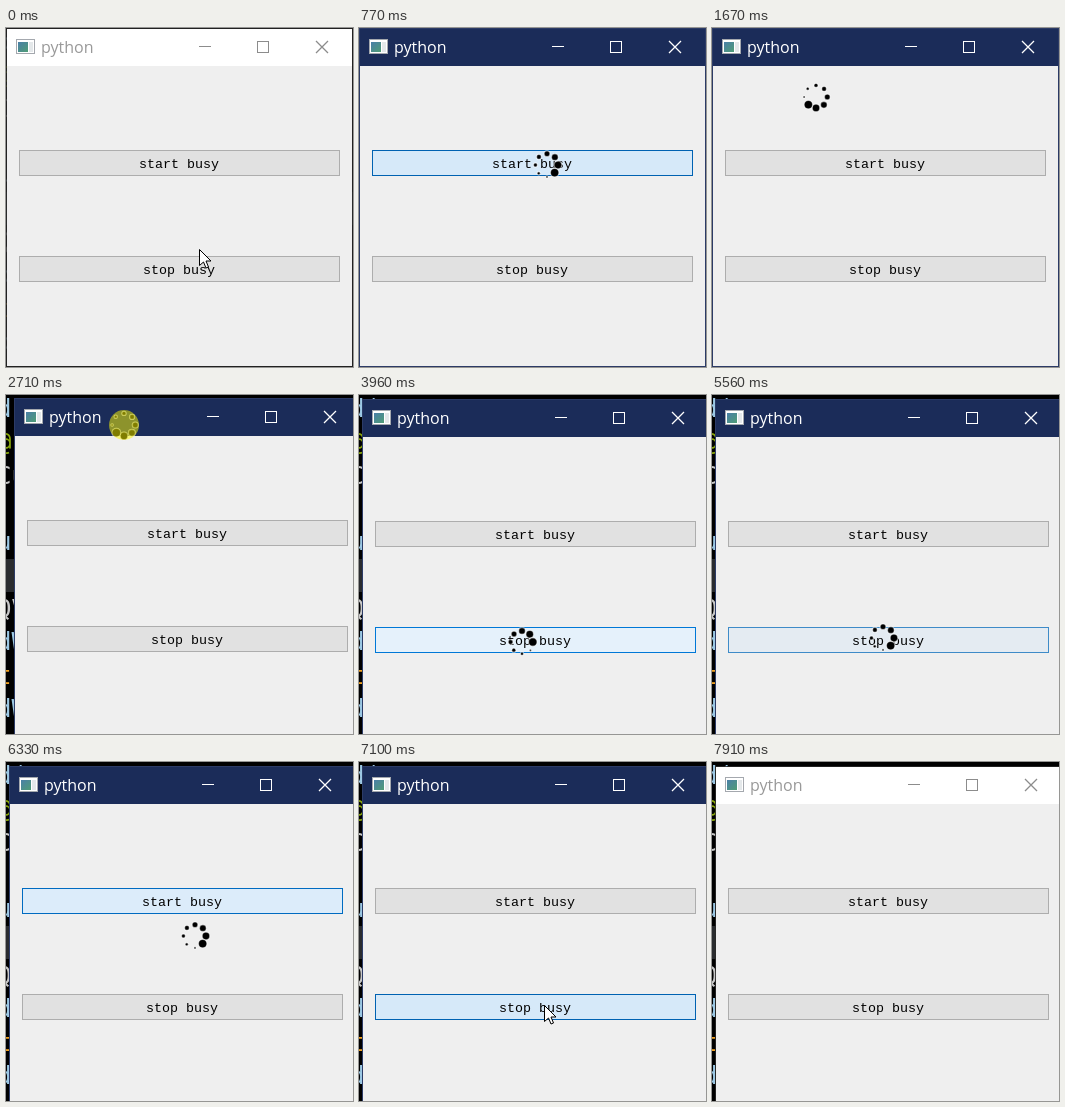
Recreate the animation shown at these times as an HTML page with a canvas. Size 347 by 339 pixels, loop 7.98 s.

```html
<!DOCTYPE html>
<html>
<head>
<meta charset="utf-8">
<style>
html, body { margin: 0; width: 100%; height: 100%; overflow: hidden; background: #000; }
canvas { display: block; }
</style>
</head>
<body>
<canvas id="stage" width="347" height="339"></canvas>
<script>
const g = document.getElementById('stage').getContext('2d');
const LOOP = 7980, BLUE = '#1b2c59';
const START = 122, STOP = 228;               // button tops inside the window
const DRAG = [2200, 3000], GRAB = [110, 27]; // time span and hold point on the title bar
const clicks = [560, 4040, 4760, 5700, 6090, 6900]; // alternately start and stop

// Pointer stops: time, x, y
const path = [
  [70, 193, 221], [560, 188, 137], [1000, 188, 137], [1670, 104, 69], [2000, ...GRAB],
  [2200, ...GRAB], [2710, 118, 30], [3000, 113, 31], [3540, 145, 257], [3960, 163, 247],
  [4310, 165, 247], [4760, 178, 139], [5050, 178, 139], [5450, 171, 243], [5840, 171, 243],
  [6080, 187, 142], [6250, 187, 142], [6330, 189, 174], [6610, 189, 192], [6900, 185, 243],
  [7100, 185, 243], [7650, 195, 342]
];

const clamp = (v, lo, hi) => Math.min(hi, Math.max(lo, v));
const mix = (a, b, p) => a.map((v, i) => Math.round(v + (b[i] - v) * p));

function pointer(t) {
  const i = path.findIndex(k => k[0] > t);
  if (i < 0) return path[path.length - 1].slice(1);
  const b = path[i], a = path[i - 1] || b;
  return mix(a.slice(1), b.slice(1), (t - a[0]) / (b[0] - a[0] || 1));
}

function origin(t) {
  const [x, y] = pointer(clamp(t, ...DRAG));
  return [x - GRAB[0], y - GRAB[1]];
}

const clicking = t => clicks.some(c => t >= c && t < c + 150);
const dragging = t => t >= 2050 && t < DRAG[1];
const isBusy = t => clicks.filter(c => t >= c + 70).length % 2 === 1;

// 0 idle, 1 hover, 2 pressed
function state(top, t) {
  const [x, y] = pointer(t), [wx, wy] = origin(t);
  const over = x - wx > 13 && x - wx < 334 && y - wy >= top && y - wy < top + 26;
  return over ? (clicking(t) ? 2 : 1) : 0;
}

// Buttons fade: the glow is the mean state over the last 250 ms
function glow(top, t) {
  let sum = 0;
  for (let i = 0; i < 25; i++) sum += state(top, t - i * 10);
  return sum / 25;
}

function shade(colors, level) {
  const i = level < 1 ? 0 : 1;
  return `rgb(${mix(colors[i], colors[i + 1], level - i)})`;
}

function box(x, y, w, h, color) {
  g.fillStyle = color;
  g.fillRect(x, y, w, h);
}

function text(str, x, y, font, color) {
  g.font = font;
  g.fillStyle = color;
  g.fillText(str, x, y);
}

function disc(x, y, r, color) {
  g.fillStyle = color;
  g.beginPath();
  g.arc(x, y, r, 0, 7);
  g.fill();
}

function editor() {
  box(0, 0, 347, 339, '#000');
  box(0, 164, 347, 33, '#2a2c2f');
  const sky = '#9cc8e4', grey = '#c8c8c8';
  const rows = [['d(', sky], ['@"', '#8aa80c'], ['Cu', grey], [], ['ur', sky], [],
    ['QV', grey], ['dW', sky], ['t:', '#f0a020'], ['dW', sky]];
  rows.forEach(([str = '', color = grey], i) =>
    text(str, -9, 22 + 33.35 * i, '24px "DejaVu Sans Mono", monospace', color));
}

function button(label, x, top, t) {
  const level = glow(top, t);
  box(13, top, 321, 26, shade([[173, 173, 173], [0, 120, 215], [0, 84, 153]], level));
  box(14, top + 1, 319, 24, shade([[225, 225, 225], [229, 241, 251], [204, 228, 247]], level));
  text(label, x, top + 18, '13.33px "Liberation Mono", monospace', '#000');
}

function icon() {
  box(10, 11, 19, 15, '#a4a8ae');
  box(11, 12, 17, 13, '#fff');
  const fade = g.createLinearGradient(12, 14, 21, 24);
  fade.addColorStop(0, '#4a7fa8');
  fade.addColorStop(1, '#4f9b78');
  box(12, 14, 10, 10, fade);
  box(23, 14, 4, 10, '#e4e8ea');
}

function appWindow(t, active) {
  box(0, 0, 347, 339, active ? '#2c3b66' : 'rgba(40,40,40,.85)');
  box(1, 1, 345, 37, active ? BLUE : '#fff');
  box(1, 38, 345, 300, '#efefef');
  icon();
  text('python', 35, 25, '16px "Open Sans", "Noto Sans", sans-serif', active ? '#fff' : '#999');

  g.strokeStyle = active ? '#fff' : '#8c8c8c';
  g.lineWidth = 1;
  g.strokeRect(251.5, 13.5, 11, 11);
  g.beginPath();
  g.moveTo(193, 18.5);
  g.lineTo(205, 18.5);
  g.stroke();
  g.lineWidth = 1.3;
  g.beginPath();
  g.moveTo(310, 13);
  g.lineTo(322, 25);
  g.moveTo(322, 13);
  g.lineTo(310, 25);
  g.stroke();

  button('start busy', 133, START, t);
  button('stop busy', 137, STOP, t);
}

// The ring advances every 94 ms and stalls briefly when the title bar is grabbed
function spinner(x, y, t) {
  const head = Math.floor((t - clamp(t - 2000, 0, 300)) / 94 + 1.5);
  for (let k = 7; k >= 0; k--) {
    const a = (head - k) * Math.PI / 4, r = 4 - 0.45 * k, R = 12.2 - 0.35 * r;
    const px = x + R * Math.cos(a), py = y + R * Math.sin(a);
    disc(px, py, r + 0.9, 'rgba(255,255,255,.6)');
    disc(px, py, r + 0.2, 'rgba(0,0,0,.5)');
    disc(px, py, r - 0.4, '#000');
  }
}

function arrow(x, y) {
  const pts = [[0, 0], [0, 16], [4, 12.5], [6.5, 18.5], [9, 17.5], [6.5, 11.5], [11.5, 11.5]];
  g.beginPath();
  for (const [dx, dy] of pts) g.lineTo(x + dx + 0.5, y + dy + 0.5);
  g.closePath();
  g.fillStyle = '#fff';
  g.fill();
  g.strokeStyle = '#000';
  g.lineWidth = 1;
  g.stroke();
}

function draw(t) {
  editor();
  g.save();
  g.translate(...origin(t));
  appWindow(t, t >= clicks[0] && t < 7910);
  g.restore();

  const [x, y] = pointer(t);
  if (isBusy(t)) spinner(x, y, t);
  else arrow(x, y);
  if (clicking(t) || dragging(t)) disc(x, y, 15, 'rgba(255,250,0,.5)');
}

function tick(now) {
  draw(now % LOOP);
  requestAnimationFrame(tick);
}
draw(0);
requestAnimationFrame(tick);
</script>
</body>
</html>
```
